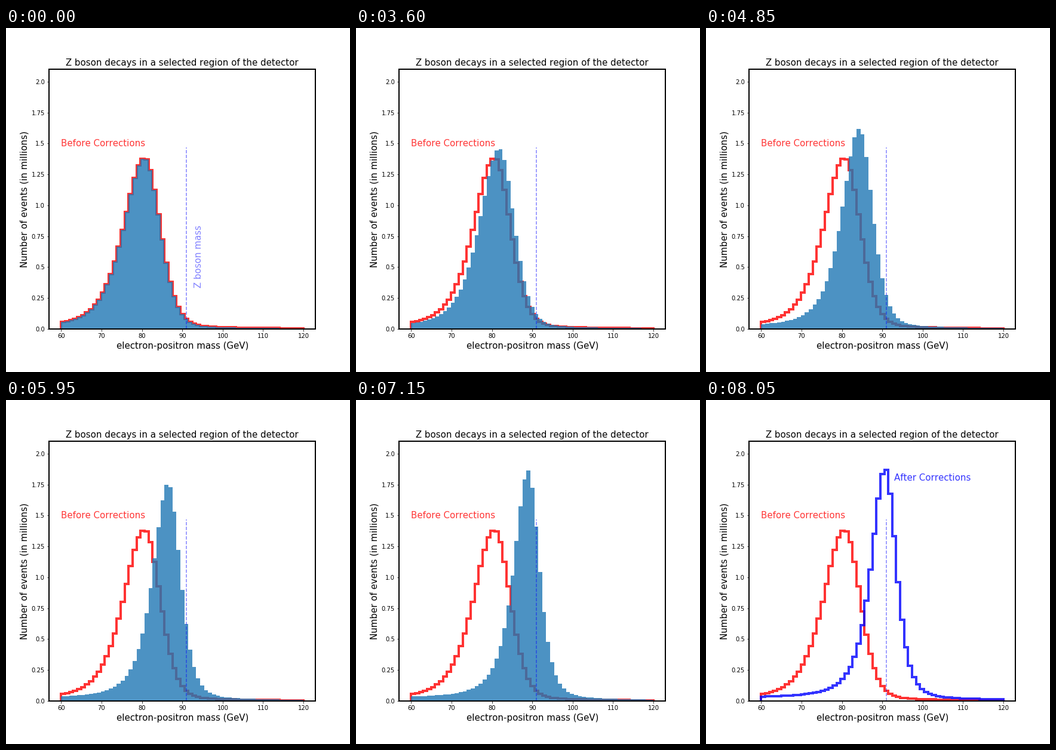
A matplotlib script for the animation above (10000 ms loop, 576 by 576 pixels).

```python
import numpy as np
import matplotlib.pyplot as plt
from matplotlib.animation import FuncAnimation

INTERVAL = 50
FRAMES = 200
START, STOP = 60, 161          # histogram moves between these frames
STEPS = 100

EDGES = np.linspace(60, 120, 62)
CENTERS = (EDGES[:-1] + EDGES[1:]) / 2

# Midpoint and full width at half maximum of both peaks, in GeV
MID_BEFORE, WIDTH_BEFORE = 79.87, 10.94
MID_AFTER, WIDTH_AFTER = 90.28, 7.49
SMEAR = np.sqrt(WIDTH_BEFORE**2 - WIDTH_AFTER**2)


def lerp(a, b, t):
    return a + (b - a) * t


def resonance(mass, height, center, widths, powers):
    """Lopsided peak: a steep core on a broad, low tail."""
    d = mass - center
    left = d < 0
    width = np.where(left, *widths)
    power = np.where(left, *powers)
    core = (1 + (d / width) ** 2 / power) ** -power
    tail = 1 / (1 + (d / np.where(left, 60, 20)) ** 2)
    return height * lerp(core, tail, 0.02)


def before(mass):
    return resonance(mass, 1.385, 80.66, (6.82, 5.31), (2.5, 8))


def after(mass):
    return resonance(mass, 1.88, 90.69, (4.36, 3.69), (1.75, 3))


def corrected(t):
    """Bin heights when the fraction t of the correction is applied."""
    width = np.hypot(WIDTH_AFTER, (1 - t) * SMEAR)
    u = (CENTERS - lerp(MID_BEFORE, MID_AFTER, t)) / width
    old = before(MID_BEFORE + u * WIDTH_BEFORE) * WIDTH_BEFORE
    new = after(MID_AFTER + u * WIDTH_AFTER) * WIDTH_AFTER
    return lerp(old, new, t * (3 - t) / 2) / width


plt.rcParams["font.family"] = "DejaVu Sans"
plt.rcParams["text.kerning_factor"] = 6
fig = plt.figure(figsize=(8, 8), dpi=72, facecolor="white")
ax = fig.add_axes([0.125, 0.125, 0.775, 0.755])
ax.set(xlim=(57, 123), ylim=(0, 2.1))
ax.set_xticks(range(60, 121, 10))
y_ticks = np.arange(0, 2.01, 0.25)
ax.set_yticks(y_ticks, [str(float(y)) for y in y_ticks])
ax.set_title("Z boson decays in a selected region of the detector", fontsize=15)
ax.set_xlabel("electron-positron mass (GeV)", fontsize=15)
ax.set_ylabel("Number of events (in millions)", fontsize=15)
for spine in ax.spines.values():
    spine.set_linewidth(2)


def label(x, y, text, color, alpha=0.8, **style):
    return ax.text(x, y, text, color=color, alpha=alpha, fontsize=15, **style)


def draw_outline(heights, color):
    return ax.stairs(heights, EDGES, color=color, alpha=0.8, linewidth=4)


draw_outline(before(CENTERS), "red")
fill = ax.stairs(before(CENTERS), EDGES, fill=True, color="tab:blue", alpha=0.8)
outline = draw_outline(after(CENTERS), "blue")
ax.axvline(91, ymax=0.7, color="blue", alpha=0.5, linestyle="--", linewidth=1.5)

label(60, 1.48, "Before Corrections", "red")
after_label = label(93, 1.78, "After Corrections", "blue")
mass_label = label(93, 0.35, "Z boson mass", "blue", alpha=0.5, rotation=90)


def update(frame):
    done = frame >= STOP
    t = np.clip((frame - START) / STEPS, 0, 1)
    fill.set_data(corrected(t))
    fill.set_visible(not done)
    outline.set_visible(done)
    after_label.set_visible(done)
    mass_label.set_visible(frame < START)
    return fill, outline, after_label, mass_label


animation = FuncAnimation(fig, update, frames=FRAMES, interval=INTERVAL,
                          repeat=True, repeat_delay=0)
plt.show()
```
